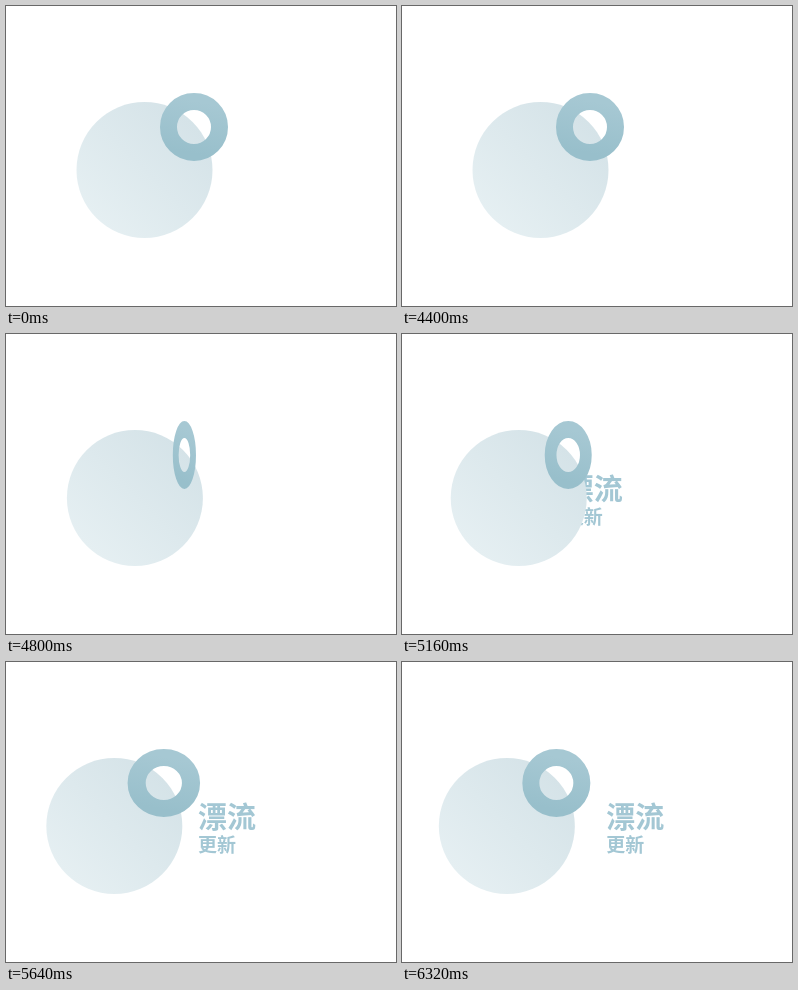
Recreate the animation shown at these times as an HTML page. Size 390 by 300 pixels, loop 8000 ms.

```html
<!DOCTYPE html>
<html lang="zh-CN">
<head>
<meta charset="utf-8">
<style>
  html, body { margin: 0; width: 100%; height: 100%; overflow: hidden; background: #fff; }
  svg { display: block; }
  text { font-family: "Noto Sans CJK SC", "Noto Sans CJK", sans-serif; font-weight: 700; fill: #a3c7d4; }
</style>
</head>
<body>
<svg width="390" height="300" viewBox="0 0 390 300">
  <defs>
    <linearGradient id="pale" x1=".85" y1=".15" x2=".15" y2=".85">
      <stop offset="0" stop-color="#d5e3e8"/>
      <stop offset="1" stop-color="#e5eff2"/>
    </linearGradient>
    <linearGradient id="deep" x1=".6" y1="0" x2=".4" y2="1">
      <stop offset="0" stop-color="#a6c8d3"/>
      <stop offset="1" stop-color="#98bfcb"/>
    </linearGradient>
  </defs>
  <g id="label">
    <text x="204.4" y="166" font-size="29">漂流</text>
    <text x="204.4" y="189.5" font-size="19">更新</text>
  </g>
  <g id="mark">
    <circle cx="138.5" cy="164" r="68" fill="url(#pale)"/>
    <circle id="ring" r="25.5" fill="none" stroke="url(#deep)" stroke-width="17"/>
  </g>
</svg>
<script>
const LOOP = 8000, START = 4410;
const [label, mark, ring] = ["label", "mark", "ring"].map(id => document.getElementById(id));

// CSS-style cubic Bezier easing, solved by bisection
function bezier(x1, y1, x2, y2) {
  const at = (a, b, s) => 3 * a * s * (1 - s) ** 2 + 3 * b * s * s * (1 - s) + s ** 3;
  return x => {
    if (x <= 0) return 0;
    if (x >= 1) return 1;
    let lo = 0, hi = 1;
    for (let i = 0; i < 24; i++) {
      const mid = (lo + hi) / 2;
      if (at(x1, x2, mid) < x) lo = mid; else hi = mid;
    }
    return at(y1, y2, lo);
  };
}

const slide = bezier(.25, .1, .25, 1);
const flip = bezier(.34, 0, .3, 1.25);

function draw(time) {
  const t = time % LOOP - START;
  const p = slide(t / 2000);
  const turn = 1 - 2 * flip(t / 1500);
  mark.setAttribute("transform", `translate(${-33.7 * p} 0)`);
  label.setAttribute("transform", `translate(${118 * (p - 1)} 0)`);
  ring.setAttribute("transform", `translate(188 121) scale(${Math.abs(turn)} 1)`);
}

const begin = performance.now();
function tick() {
  draw(performance.now() - begin);
  requestAnimationFrame(tick);
}
tick();
</script>
</body>
</html>
```
